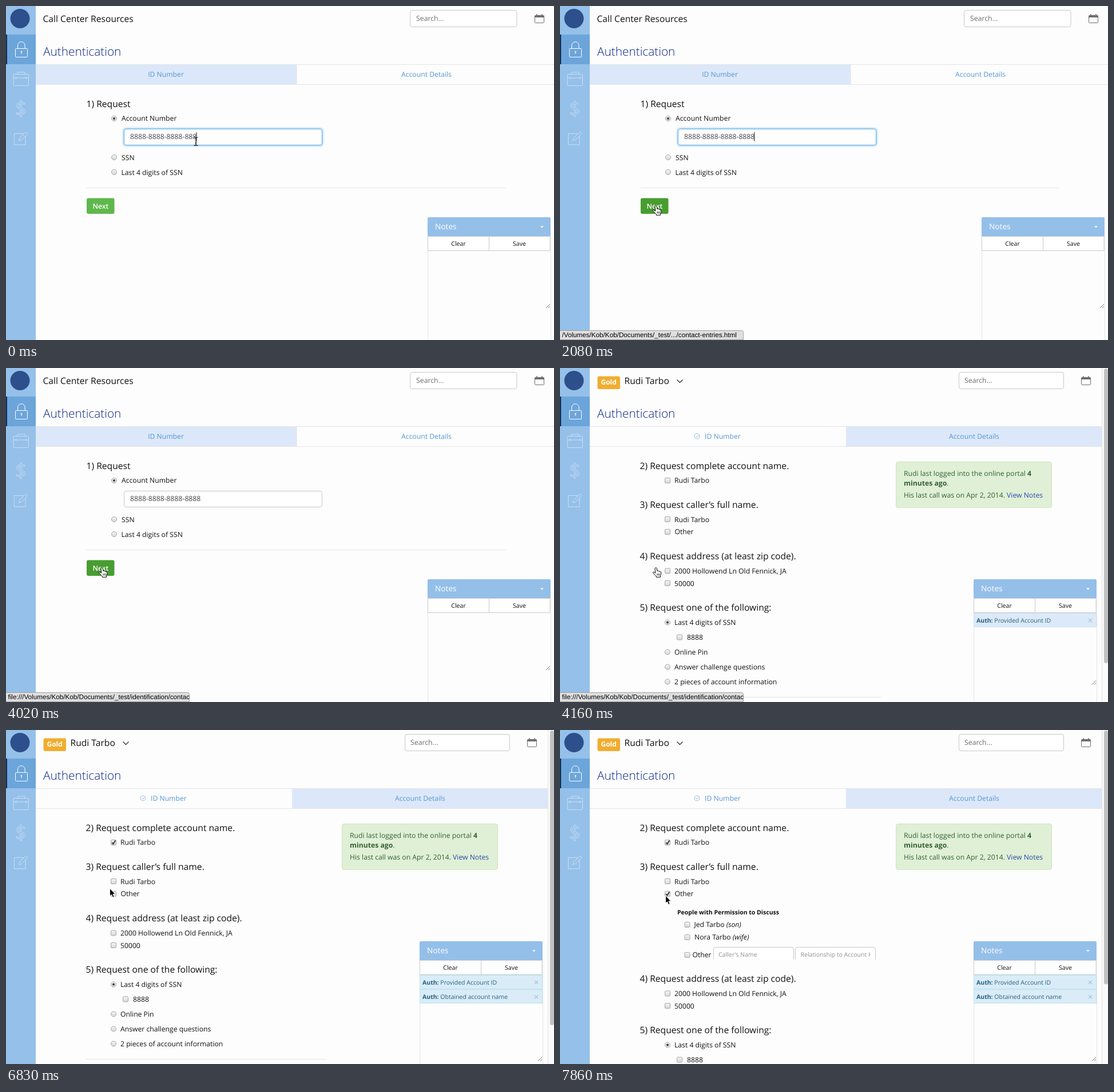
These frames come from a looping animation (958 by 585 pixels, 8000 ms). An HTML page:

```html
<!DOCTYPE html>
<html lang="en">
<head>
<meta charset="utf-8">
<title>Call Center Resources</title>
<style>
  html, body { margin: 0; width: 100%; height: 100%; overflow: hidden; background: #fdfdfd; }
  svg { display: block; width: 100vw; height: 100vh; }
  text { font: 12.2px "Open Sans", "Noto Sans", sans-serif; fill: #111; text-rendering: geometricPrecision; white-space: pre; }
  text.head { font-size: 15.65px; }
  text.title { font-size: 20.8px; font-weight: 300; fill: #0a2585; }
  text.tab { fill: #5596d0; }
  text.mid { text-anchor: middle; }
  text.small { font-size: 10.6px; }
  text.hint { font-size: 10.5px; fill: #8f8f8f; }
  text.search { font-size: 12.3px; fill: #6c6c6c; }
  text.white { fill: #fff; }
  text.green { fill: #33602f; }
  text.note { font-size: 10.5px; fill: #28607f; }
  text.status { font: 11.7px "Liberation Sans", Arial, sans-serif; fill: #000; }
  .b { font-weight: 700; }
  .i { font-style: italic; }
  .link { fill: #2a49a8; }
  .line { stroke: #e4e4e4; fill: none; }
  .field { fill: #fff; stroke: #c8c8c8; }
  .icon { fill: none; stroke: #fff; stroke-width: 1; }
  .dim { opacity: .5; }
</style>
</head>
<body>
<svg viewBox="0 0 958 585" preserveAspectRatio="none">
  <defs>
    <linearGradient id="ctl" x2="0" y2="1">
      <stop stop-color="#f6f6f6"/><stop offset="1" stop-color="#d6d6d6"/>
    </linearGradient>
    <rect id="box" x="-4.5" y="-4.5" width="9" height="9" rx="1.5" fill="url(#ctl)" stroke="#a6a6a6"/>
    <circle id="radio" r="4.5" fill="url(#ctl)" stroke="#a6a6a6"/>
    <g id="radioOn"><use href="#radio"/><circle r="2.1" fill="#444"/></g>
    <path id="tick" d="M-2.7 0L-.7 2.6 3.4-3.6" fill="none" stroke="#333" stroke-width="1.9"/>
    <path id="grip" d="M0 7L7 0M4 7L7 4" stroke="#777" fill="none"/>
    <path id="cross" d="M-3-3L3 3M3-3L-3 3" stroke="#a9cbe0" stroke-width="1.5"/>
    <g id="calendar" fill="none" stroke="#6e6e6e">
      <rect x=".5" y="2.5" width="16" height="13" rx="1"/>
      <path d="M0 4.5H17" stroke-width="3"/><path d="M4 0V4M13 0V4" stroke-width="1.5"/>
    </g>
    <g id="notes">
      <path class="line" d="M737.5 403V585M952.5 403V585"/>
      <path d="M737 403V372q0-2 2-2H950q2 0 2 2V403Z" fill="#94bfe9"/>
      <text class="white" x="750" y="391" style="font-size:13.7px">Notes</text>
      <path d="M934 385.5h6l-3 3Z" fill="#fff"/>
      <path d="M737.5 403.5H951V428.5H737.5ZM844.5 403V428.5" fill="#fff" stroke="#c9c9c9"/>
      <text class="small mid" x="791" y="420">Clear</text>
      <text class="small mid" x="897.5" y="420">Save</text>
    </g>
    <clipPath id="reveal"><rect id="revealBox" x="140" y="296" width="440" height="0"/></clipPath>
    <clipPath id="hintClip"><rect x="412" y="380" width="131" height="30"/></clipPath>
    <clipPath id="statusClip"><rect id="statusBox" y="567" width="320" height="18"/></clipPath>
    <filter id="glow" x="-5%" y="-40%" width="110%" height="180%"><feGaussianBlur stdDeviation="1.6"/></filter>
  </defs>

  <rect width="958" height="585" fill="#fdfdfd"/>

  <!-- sidebar -->
  <rect width="52" height="585" fill="#95c0e9"/>
  <rect y="50" width="52" height="52" fill="#6ca5da"/>
  <rect y="50" width="2" height="52" fill="#12305f"/>
  <circle cx="24.5" cy="22" r="17" fill="#2d4f8c"/>
  <g class="icon">
    <rect x="16.5" y="74.5" width="21" height="15" rx="1"/>
    <path d="M20.5 74V69a6.3 6.3 0 0 1 12.6 0V74M27 81V84"/>
    <circle cx="27" cy="80" r="1"/>
  </g>
  <g class="icon dim">
    <rect x="13" y="119.5" width="26.5" height="20" rx="1"/>
    <path d="M13 126H39.5M20 119V116H33V119M17.5 124V128M35 124V128"/>
    <path d="M14.5 223.5H31M34 228V243H14.5V223.5M22.5 236L24 231 35 220.5 38 223.5 27 234.5Z"/>
  </g>
  <text class="dim mid" x="26" y="192" style="font-size:34px;fill:none;stroke:#fff;stroke-width:.8">$</text>

  <text class="title" x="65" y="86.5">Authentication</text>

  <!-- first page -->
  <g id="page1">
    <text class="head" x="64.5" y="28">Call Center Resources</text>
    <rect class="field" x="706.5" y="7.5" width="186.5" height="29" rx="3.5"/>
    <text class="search" x="717" y="26">Search...</text>
    <use href="#calendar" x="924" y="14"/>
    <rect x="52" y="103" width="456" height="34" fill="#dce8fa"/>
    <path class="line" d="M52 102.5H958M52 137.5H958M508 103V137"/>
    <text class="tab mid" x="279.5" y="124">ID Number</text>
    <text class="tab mid" x="735" y="124">Account Details</text>

    <text class="head" x="140.5" y="177">1) Request</text>
    <use href="#radioOn" x="189" y="197"/><text x="202" y="201">Account Number</text>
    <rect id="halo" x="206" y="215" width="347" height="29" rx="4" fill="none" stroke="#8cc4f0" stroke-width="2.5" filter="url(#glow)"/>
    <rect id="entry" class="field" x="206.5" y="215.5" width="346" height="28" rx="3.5"/>
    <text id="digits" x="217" y="233" style="fill:#444"></text>
    <rect id="caret" y="221" width="1" height="16" fill="#111"/>
    <use href="#radio" x="189" y="265"/><text x="202" y="270">SSN</text>
    <use href="#radio" x="189" y="291"/><text x="201.5" y="296">Last 4 digits of SSN</text>
    <path class="line" d="M141 318.5H873"/>
    <rect id="next" x="141" y="336.5" width="48.5" height="27.5" rx="3"/>
    <text class="white" x="151.5" y="355" style="font-weight:600">Next</text>
    <use href="#notes"/>
    <use href="#grip" x="944" y="522"/>
  </g>

  <!-- second page -->
  <g id="page2">
    <rect x="65.5" y="14.5" width="39.5" height="22.5" rx="3" fill="#f0ad2f"/>
    <text class="white b" x="71.5" y="29" style="font-size:12px">Gold</text>
    <text class="head" x="112.5" y="28">Rudi Tarbo</text>
    <path d="M204.5 20.5L209.5 25.5 214.5 20.5" fill="none" stroke="#333" stroke-width="1.3"/>
    <rect class="field" x="697.5" y="7.5" width="183" height="29" rx="3.5"/>
    <text class="search" x="707" y="26">Search...</text>
    <use href="#calendar" x="911" y="14"/>
    <rect x="500" y="103" width="448" height="34" fill="#dce8fa"/>
    <path class="line" d="M52 102.5H948M52 137.5H948"/>
    <g fill="none" stroke="#86b5e0" stroke-width=".9"><circle cx="239.5" cy="119.5" r="4.5"/><path d="M237.5 119.5l1.7 1.8 3-3.6"/></g>
    <text class="tab" x="253" y="124">ID Number</text>
    <text class="tab mid" x="724" y="124">Account Details</text>

    <rect x="587.5" y="164.5" width="272" height="80" rx="3.5" fill="#dff0d6" stroke="#cfe4be"/>
    <text class="green" x="601" y="189">Rudi last logged into the online portal <tspan class="b">4</tspan></text>
    <text class="green" x="601" y="206"><tspan class="b">minutes ago</tspan>.</text>
    <text class="green" x="601" y="227">His last call was on Apr 2, 2014. <tspan class="link">View Notes</tspan></text>

    <text class="head" x="139.5" y="177">2) Request complete account name.</text>
    <use href="#box" x="188" y="197"/><text x="200" y="201">Rudi Tarbo</text>
    <rect id="press1" x="183.5" y="192.5" width="9" height="9" rx="1.5" fill="#777" opacity=".45"/>
    <use id="tick1" href="#tick" x="188" y="197"/>
    <text class="head" x="139.5" y="245">3) Request caller’s full name.</text>
    <use href="#box" x="188" y="265"/><text x="200" y="270">Rudi Tarbo</text>
    <use href="#box" x="188" y="287"/><text x="200.5" y="291">Other</text>
    <rect id="press2" x="183.5" y="282.5" width="9" height="9" rx="1.5" fill="#777" opacity=".45"/>
    <use id="tick2" href="#tick" x="188" y="287"/>

    <g clip-path="url(#reveal)">
      <text class="b" x="205" y="323" style="font-size:10.5px">People with Permission to Discuss</text>
      <use href="#box" x="222.5" y="341"/><text x="234.5" y="345">Jed Tarbo <tspan class="i">(son)</tspan></text>
      <use href="#box" x="222.5" y="363"/><text x="235" y="367">Nora Tarbo <tspan class="i">(wife)</tspan></text>
      <use href="#box" x="222.5" y="394"/><text x="231.5" y="398">Other</text>
      <rect class="field" x="268.5" y="380.5" width="140" height="28" rx="3.5"/>
      <text class="hint" x="277" y="397">Caller's Name</text>
      <rect class="field" x="411.5" y="380.5" width="140" height="28" rx="3.5"/>
      <text class="hint" x="420.5" y="397" clip-path="url(#hintClip)">Relationship to Account Holder</text>
    </g>

    <g id="lower">
      <text class="head" x="139.5" y="335">4) Request address (at least zip code).</text>
      <use href="#box" x="188" y="355.5"/><text x="200" y="360">2000 Hollowend Ln Old Fennick, JA</text>
      <use href="#box" x="188" y="377"/><text x="200" y="381.5">50000</text>
      <text class="head" x="139.5" y="425">5) Request one of the following:</text>
      <use href="#radioOn" x="188" y="445.5"/><text x="200" y="450">Last 4 digits of SSN</text>
      <use href="#box" x="209" y="471.5"/><text x="222" y="476">8888</text>
      <use href="#radio" x="188" y="497.5"/><text x="200" y="502">Online Pin</text>
      <use href="#radio" x="188" y="523.5"/><text x="200" y="528">Answer challenge questions</text>
      <use href="#radio" x="188" y="549.5"/><text x="200" y="554">2 pieces of account information</text>
      <path class="line" d="M140 576.5H561"/>
    </g>

    <use href="#notes" x="-14"/>
    <rect id="row1" x="723.5" y="429.5" width="214" height="24"/>
    <text class="note" x="728" y="446"><tspan class="b">Auth:</tspan> Provided Account ID</text>
    <use href="#cross" x="927" y="442"/>
    <g id="row2">
      <rect x="723.5" y="454.5" width="214" height="24" fill="#d9ecf7" stroke="#bfe5f1"/>
      <text class="note" x="728" y="471"><tspan class="b">Auth:</tspan> Obtained account name</text>
      <use href="#cross" x="927" y="467.5"/>
    </g>
    <use id="grip2" href="#grip" x="930"/>

    <rect x="948" width="10" height="585" fill="#fafafa"/>
    <path class="line" d="M947.5 0V585"/>
    <rect id="thumb" x="951" y="1" width="7" rx="3.5" fill="#c2c2c2"/>
  </g>

  <!-- browser status bubble -->
  <g id="status">
    <path id="bubble" fill="#dfdfdf" stroke="#a2a2a2"/>
    <text id="address" class="status" x="3.5" y="580" clip-path="url(#statusClip)"></text>
  </g>

  <!-- pointers, origin at the hot spot -->
  <g id="pointer">
    <path id="beam" d="M-3.5-7.5Q0-7.5 0-5.5Q0-7.5 3.5-7.5M0-6V6M-3.5 7Q0 7 0 5Q0 7 3.5 7M-1.5 2.5H1.5" fill="none" stroke="#111" stroke-width="1.2"/>
    <path id="arrow" d="M0 0V13.5L3 10.8 5.2 15.8 7.7 14.7 5.5 9.9H9.6Z" fill="#000" stroke="#fff"/>
    <g id="hand" stroke="#000">
      <path d="M-2 1Q-2-.8-.4-.8T1.3 1L1.8 5Q3.5 3.8 4.5 5.5Q6.300 4.700 7 6.500Q8.800 6 8.900 8.200Q8.900 11 7.600 13V15.800H.2V14.300Q-2.500 11.500-5.600 8.300Q-5.500 6.300-3.400 7.200L-1.200 8.700Z" fill="#fff"/>
      <path d="M2 9.5V13M4 9.5V13M6 9.5V13" stroke-width=".8"/>
    </g>
  </g>
</svg>
<script>
const LOOP = 8000, STEP = 148.2;  // the screen is refreshed about 6.75 times a second
const $ = id => document.getElementById(id);
const set = (id, attrs) => { for (const k in attrs) $(id).setAttribute(k, attrs[k]); };
const show = (id, on) => { $(id).style.display = on ? "" : "none"; };
const within = (n, a, b) => n >= a && n < b;
const clamp = v => Math.max(0, Math.min(1, v));

const SITE = "/Volumes/Kob/Kob/Documents/_test/";
const SHORT = SITE + ".../contact-entries.html";
const FULL = "file://" + SITE + "identification/contact-entries.html";

// step, x, y
const path = [
  [0, 332, 237.5], [3, 332, 237.5], [4, 322, 242], [5, 290, 270], [6, 240, 310], [7, 194, 338],
  [8, 170, 349], [9, 168, 350.5], [28, 168, 350.5], [30, 185, 275], [32, 218, 196],
  [33, 223, 182], [34, 209, 187], [35, 193, 192], [36, 188, 194], [42, 188, 194],
  [44, 184, 238], [45, 181, 264], [46, 181.5, 277.5], [49, 184.5, 290], [54, 184.5, 290]
];

function place(n) {
  const i = Math.max(1, path.findIndex(p => p[0] >= n));
  const [a, ax, ay] = path[i - 1], [b, bx, by] = path[i];
  const k = (n - a) / (b - a);
  return [ax + (bx - ax) * k, ay + (by - ay) * k];
}

function drawForm(n) {
  const focus = n < 26;
  show("halo", focus);
  $("entry").style.stroke = focus ? "#66afe9" : "#c8c8c8";
  $("digits").textContent = "8888-8888-8888-888" + (n ? "8" : "");
  set("caret", { x: n ? 339.3 : 332.5 });
  show("caret", n < 4 || within(n, 7, 11) || within(n, 14, 17) || within(n, 21, 24));
  $("next").style.fill = n < 8 ? "#5fb84d" : "#489d31";
}

function drawDetails(n) {
  const swing = .5 - Math.cos(Math.PI * clamp((n - 50.7) / 2.7)) / 2;
  const open = Math.round(111.6 * swing);
  const noted = n >= 43;
  show("press1", n === 40);
  show("tick1", n > 40);
  show("press2", n === 50);
  show("tick2", n > 50);
  set("revealBox", { height: open });
  set("lower", { transform: `translate(0 ${open})` });
  set("thumb", { height: 585 * 585 / (662 + open) - 1 });
  set("row1", noted ? { fill: "#d9ecf7", stroke: "#bfe5f1" } : { fill: "#dce9f8", stroke: "#cfe2f4" });
  set("row2", { opacity: clamp((n - 42) / 2) });
  set("grip2", { y: noted ? 573 : 547.5 });
}

function drawStatus(n) {
  const on = within(n, 9, 30);
  show("status", on);
  if (!on) return;
  const wide = n < 26 ? clamp((n - 16) / 3) : 0;
  const w = 320.5 + 83 * wide;
  set("bubble", { d: `M-1 568.5H${w - 3}q3 0 3 3V584.5H-1Z` });
  set("statusBox", { width: w });
  $("address").textContent = n < 17 ? SHORT : FULL;
}

function drawPointer(n) {
  const [x, y] = place(n);
  const kind = n < 5 ? "beam" : within(n, 8, 29) ? "hand" : "arrow";
  for (const k of ["beam", "hand", "arrow"]) show(k, k === kind);
  set("pointer", { transform: `translate(${x} ${y})` });
}

let last = -1;
function draw() {
  const n = Math.floor((performance.now() % LOOP) / STEP);
  if (n !== last) {
    last = n;
    show("page1", n < 28);
    show("page2", n >= 28);
    drawForm(n);
    drawDetails(n);
    drawStatus(n);
    drawPointer(n);
  }
  requestAnimationFrame(draw);
}
draw();
</script>
</body>
</html>
```
